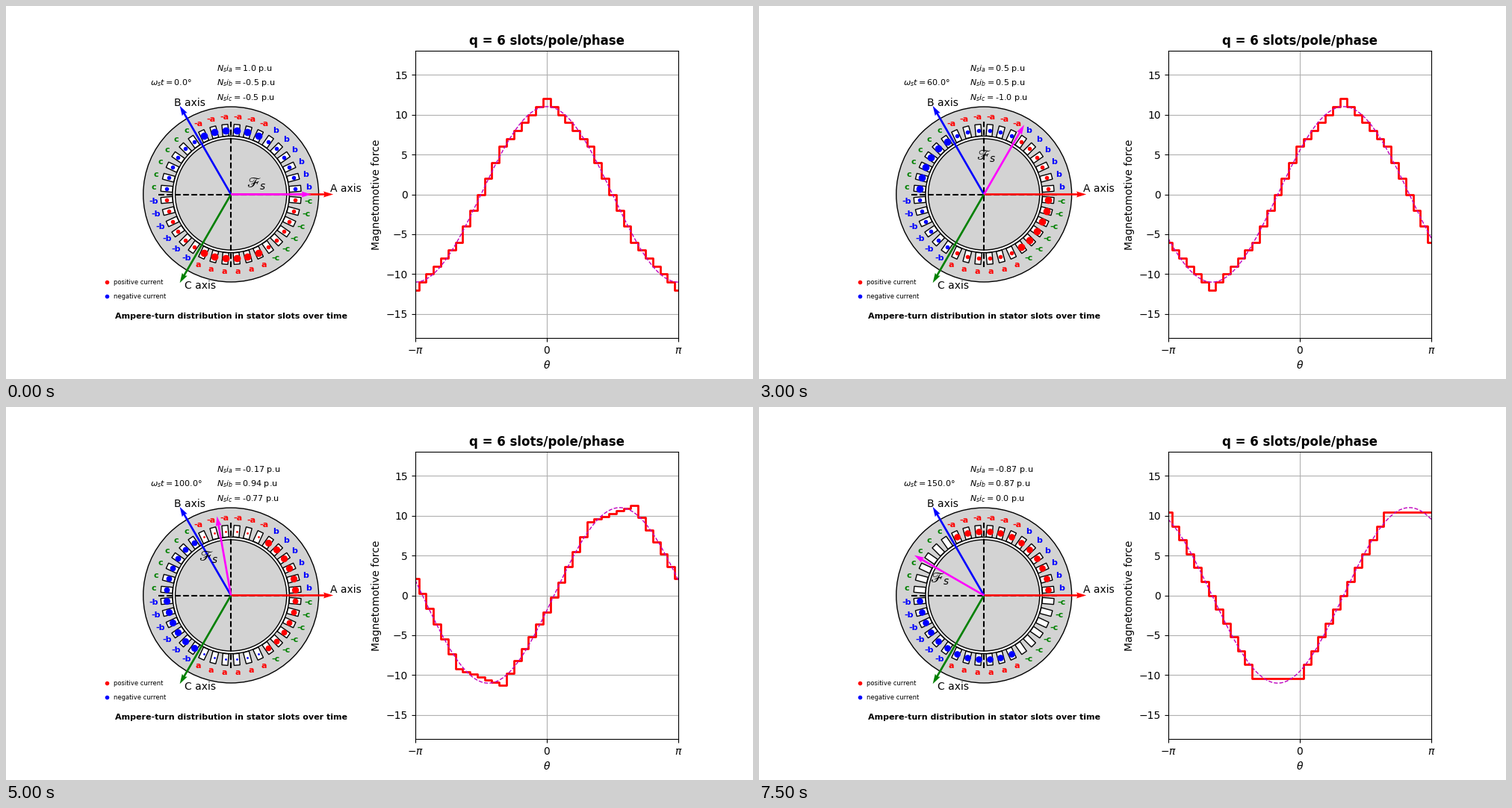
Animation of 1000x500 px, one loop 8 s. Source, as a matplotlib script:

```python
import numpy as np
import matplotlib.pyplot as plt
from matplotlib.animation import FuncAnimation
from matplotlib.patches import Circle, Rectangle
from matplotlib.transforms import Affine2D

STEPS = 16
STEP_DEG = 10
Q = 6                      # slots per pole per phase
PEAK = 11                  # fundamental amplitude
SCALE = 36                 # force units across the left axes
SLOT_DEG = np.arange(5, 360, 10)
# (phase index, sign, label, colour) for each 60 degree belt
BELTS = [(1, 1, "b", "blue"), (0, -1, "-a", "red"), (2, 1, "c", "green"),
         (1, -1, "-b", "blue"), (0, 1, "a", "red"), (2, -1, "-c", "green")]


def polar(r, deg):
    t = np.radians(deg)
    return r * np.cos(t), r * np.sin(t)


def phase_currents(deg):
    return np.cos(np.radians(deg - np.array([0, 120, 240])))


def slot_currents(i):
    return np.repeat([sign * i[ph] for ph, sign, _, _ in BELTS], Q)


fig = plt.figure(figsize=(10, 5), dpi=100)

# Machine cross-section
ax = fig.add_subplot(121)
ax.set_aspect("equal")
ax.set_xlim(-1.5, 1.5)
ax.set_ylim(-1.5, 1.5)
ax.axis("off")

for r, face in [(1, "lightgray"), (0.665, "white"), (0.635, "lightgray")]:
    ax.add_patch(Circle((0, 0), r, fc=face, ec="black", lw=1))

dots = []
for k, deg in enumerate(SLOT_DEG):
    _, _, label, color = BELTS[k // Q]
    turn = Affine2D().rotate_deg(deg) + ax.transData
    ax.add_patch(Rectangle((0.668, -0.034), 0.132, 0.068, fc="white",
                           ec="black", lw=1, transform=turn))
    ax.text(*polar(0.885, deg), label, color=color, size=8, weight="bold",
            ha="center", va="center")
    dots += ax.plot(*polar(0.735, deg), "o")

ax.plot([-0.83, 0.83], [0, 0], "k--", lw=1.5)
ax.plot([0, 0], [-0.83, 0.83], "k--", lw=1.5)


def arrow(length, deg, color):
    return ax.quiver(0, 0, *polar(length, deg), color=color, scale=SCALE,
                     scale_units="width", zorder=2.5)


for deg, color in [(0, "red"), (120, "blue"), (240, "green")]:
    arrow(14, deg, color)
force = arrow(PEAK, 0, "magenta")
force_label = ax.text(0, 0, r"$\mathscr{F}_s$", size=14, ha="right")

ax.text(1.13, 0.03, "A axis")
ax.text(-0.65, 1.01, "B axis")
ax.text(-0.525, -1.08, "C axis")

for y, name, color in [(-1.0, "positive", "red"), (-1.165, "negative", "blue")]:
    ax.plot(-1.415, y, "o", color=color, ms=3)
    ax.text(-1.335, y - 0.025, name + " current", size=6)
ax.text(0, -1.42, "Ampere-turn distribution in stator slots over time",
        size=8, weight="bold", ha="center")

angle_text = ax.text(-0.92, 1.245, "", size=8)
current_texts = [ax.text(-0.16, y, "", size=8) for y in (1.41, 1.245, 1.08)]

# Force along the air gap
gap = fig.add_subplot(122)
gap.set_title("q = 6 slots/pole/phase", weight="bold")
gap.set_xlabel(r"$\theta$")
gap.set_ylabel("Magnetomotive force")
gap.set_xlim(-np.pi, np.pi)
gap.set_ylim(-18, 18)
gap.set_xticks([-np.pi, 0, np.pi], [r"$-\pi$", "0", r"$\pi$"])
gap.grid(True)

theta = np.linspace(-np.pi, np.pi, 361)
edges = np.radians(np.concatenate([[-180], np.arange(-175, 180, 10), [180]]))
stairs, = gap.plot([], [], "r", lw=2, drawstyle="steps-post")
wave, = gap.plot([], [], "m--", lw=1)


def update(n):
    deg = n * STEP_DEG
    i = phase_currents(deg)
    slots = slot_currents(i)

    for dot, c in zip(dots, slots):
        size = abs(round(c, 2))
        dot.set_color("red" if c > 0 else "blue")
        dot.set_markersize(6 * size)
        dot.set_visible(size > 0)

    force.set_UVC(*polar(PEAK, deg))
    force_label.set_position(polar(0.415, deg + 10))
    angle_text.set_text(rf"$\omega_st = ${float(deg)}°")
    for text, name, c in zip(current_texts, "abc", i):
        text.set_text(rf"$N_si_{name} = ${float(round(c, 2))} p.u")

    # each slot current lifts the force by twice its value
    half = len(slots) // 2
    start = slots[:half].sum()
    rise = 2 * np.concatenate([slots[half:], slots[:half]])
    level = start + np.concatenate([[0], np.cumsum(rise)])
    stairs.set_data(edges, np.append(level, level[-1]))
    wave.set_data(theta, PEAK * np.cos(theta - np.radians(deg)))
    return []


anim = FuncAnimation(fig, update, frames=STEPS, interval=500,
                     init_func=lambda: update(0), repeat=True, repeat_delay=0)
plt.show()
```
